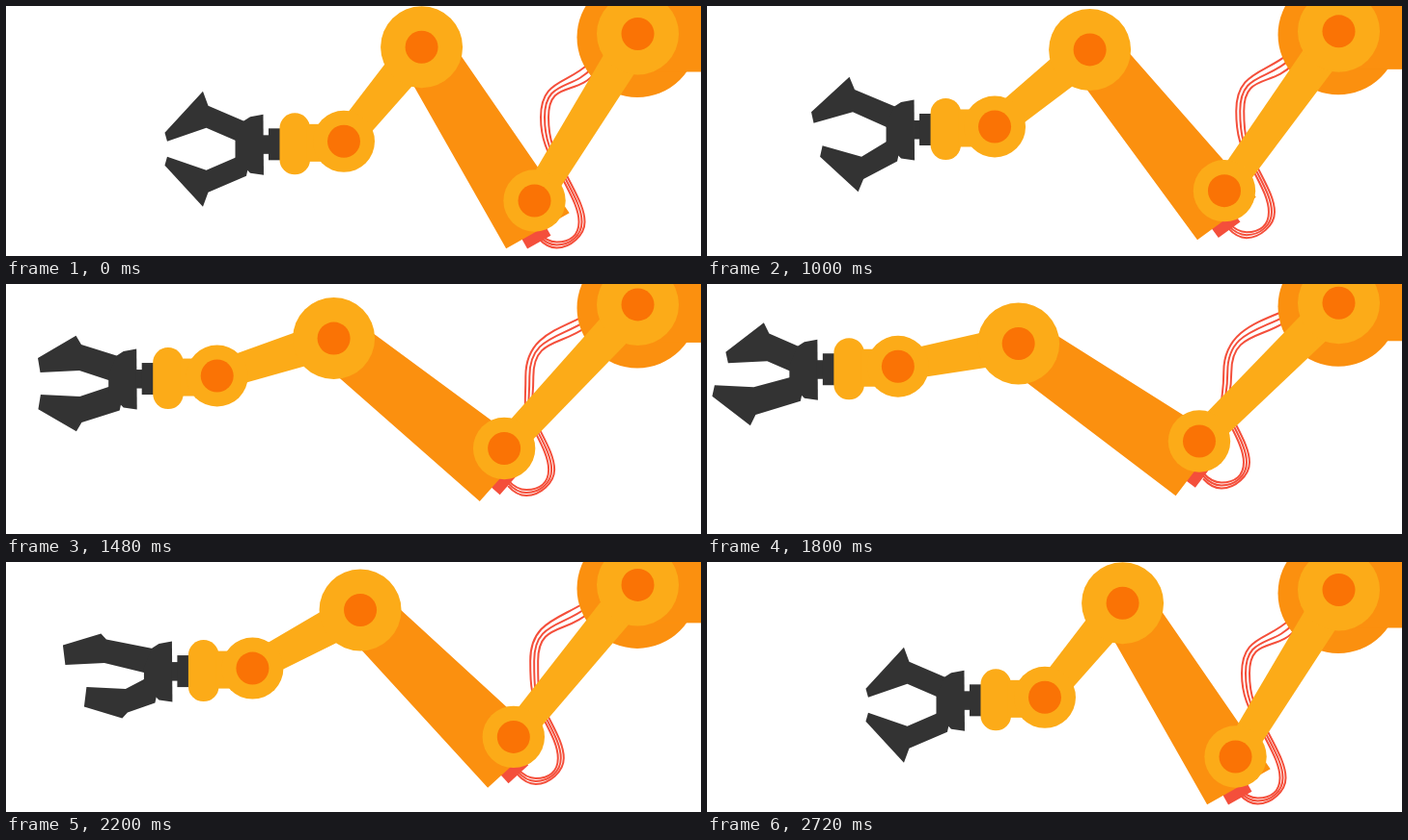
An HTML page with a canvas for the animation above (3280 ms loop, 720 by 260 pixels).

```html
<!DOCTYPE html>
<html lang="en">
<head>
<meta charset="utf-8">
<title>Robot arm</title>
<style>
html, body { margin: 0; overflow: hidden; background: #fff; }
canvas { display: block; }
</style>
</head>
<body>
<canvas id="stage" width="720" height="260"></canvas>
<script>
const ctx = document.getElementById('stage').getContext('2d');
const LIGHT = '#fcab18', ORANGE = '#fb900f', KNOB = '#fa7305', DARK = '#333', RED = '#f44f3b';
const LOOP = 3280, STEP = 40, START = 720, STEPS = 50, REACH = 24;

const rad = deg => deg * Math.PI / 180;
const polar = (p, length, deg) => ({ x: p.x + length * Math.cos(rad(deg)), y: p.y + length * Math.sin(rad(deg)) });
const clamp = (v, lo = 0, hi = 1) => Math.max(lo, Math.min(hi, v));
const smooth = p => p * p * (3 - 2 * p);

function disc(p, r, color) {
  ctx.fillStyle = color;
  ctx.beginPath();
  ctx.arc(p.x, p.y, r, 0, 7);
  ctx.fill();
}

function joint(p, r) {
  disc(p, r, LIGHT);
  disc(p, 17, KNOB);
}

function shape(points, color) {
  ctx.fillStyle = color;
  ctx.beginPath();
  for (const [x, y] of points) ctx.lineTo(x, y);
  ctx.fill();
}

function rect(x, y, w, h, color) {
  ctx.fillStyle = color;
  ctx.fillRect(x, y, w, h);
}

function local(p, deg, draw) {
  ctx.save();
  ctx.translate(p.x, p.y);
  ctx.rotate(rad(deg));
  draw();
  ctx.restore();
}

function bar(p, deg, length) {
  local(p, deg, () => shape([[0, -19.5], [length, -15], [length, 15], [0, 19.5]], LIGHT));
}

function cables(s, e, u) {
  const mx = (s.x + e.x) / 2, my = (s.y + e.y) / 2;
  ctx.strokeStyle = RED;
  ctx.lineWidth = 2;
  for (let i = 0; i < 3; i++) {
    const turn = 149 + u - 5.5 * i, gap = 3 * i;
    const from = polar(s, 58, turn), bend = polar(s, 90, turn - 5);
    const left = mx - 47 + 4 * i, right = e.x + 46 + gap, low = e.y + 43 + gap;
    const cx = e.x + 28 + gap, cy = e.y - 25;
    ctx.beginPath();
    ctx.moveTo(from.x, from.y);
    ctx.bezierCurveTo(bend.x, bend.y, left, my - 40, left, my);
    ctx.bezierCurveTo(left, my + 30, cx - 9, cy - 18, cx, cy);
    ctx.bezierCurveTo(cx + 9, cy + 18, right, e.y + 8, right, e.y + 22);
    ctx.bezierCurveTo(right, e.y + 36, e.x + 37, low, e.x + 23, low);
    ctx.quadraticCurveTo(e.x + 13, low, e.x + 4, e.y + 33 + gap);
    ctx.stroke();
  }
}

// One finger above the grip axis; the other is its mirror image
function finger(side, u) {
  const grip = smooth(clamp((u - 4) / 8.5));
  const fold = grip - .06 * Math.max(0, u - 12.5);
  const slide = side * grip * (1.8 * (u - 12.5) - 11);
  const spread = 4 * Math.sin(Math.PI * clamp(u / 9));
  const tip = (x, y) => [x + slide, y - spread];
  ctx.save();
  ctx.translate(0, 8);
  ctx.scale(1, side);
  shape([
    [-112.5, -9 + 5.5 * grip],
    tip(-142.5, -22 + 8.5 * grip),
    tip(-183, -8 - 3.5 * grip),
    tip(-185.5, -17 - 15 * fold),
    tip(-146, -60 + 16 * fold),
    tip(-140.5, -45 + 7 * fold),
    [-101, -28],
    [-95, 0]
  ], DARK);
  ctx.restore();
}

function hand(w, u) {
  local(w, 0, () => {
    finger(1, u);
    finger(-1, u);
    shape([[-83.5, -28], [-97, -25.5], [-104, -21], [-112.5, -1], [-112.5, 17], [-97, 33], [-83, 35]], DARK);
    rect(-84, -6.5, 8, 19.5, DARK);
    rect(-78, -13.5, 13, 33, DARK);
    ctx.fillStyle = LIGHT;
    ctx.beginPath();
    ctx.roundRect(-66.5, -29.5, 31.5, 64, 15.7);
    ctx.fill();
    rect(-38, -18, 20, 39, LIGHT);
  });
}

function render(u) {
  const upper = 121.66 + .6 * u, fore = 129.4 + 1.77 * u;
  const s = { x: 654.5, y: 29 - .41 * u };
  const e = polar(s, 203.8, upper);
  const j = polar(e, 198 + .67 * u, 233.8 - 1.127 * u);
  const w = polar(j, 127, fore);

  ctx.clearRect(0, 0, 720, 260);
  cables(s, e, u);
  disc({ x: s.x - .5, y: s.y + 3.5 }, 62.5, ORANGE);
  rect(s.x, -5, 80, s.y + 44.5, ORANGE);

  local(j, 60.5 - 1.03 * u, () => {
    rect(222, -20, 14.5, 28, RED);
    shape([[0, 27], [225.5, 27], [225.5, -48.3], [27, -31], [0, -29]], ORANGE);
  });

  bar(s, upper, 203.8);
  joint(s, 42.5);
  joint(e, 32.2);
  bar(j, fore, 127);
  joint(j, 42.5);
  hand(w, u);
  joint(w, 32);
}

function frame() {
  const k = Math.floor((performance.now() % LOOP - START) / STEP);
  render(clamp(Math.min(k, STEPS - k) - .5, 0, REACH));
  requestAnimationFrame(frame);
}
frame();
</script>
</body>
</html>
```
